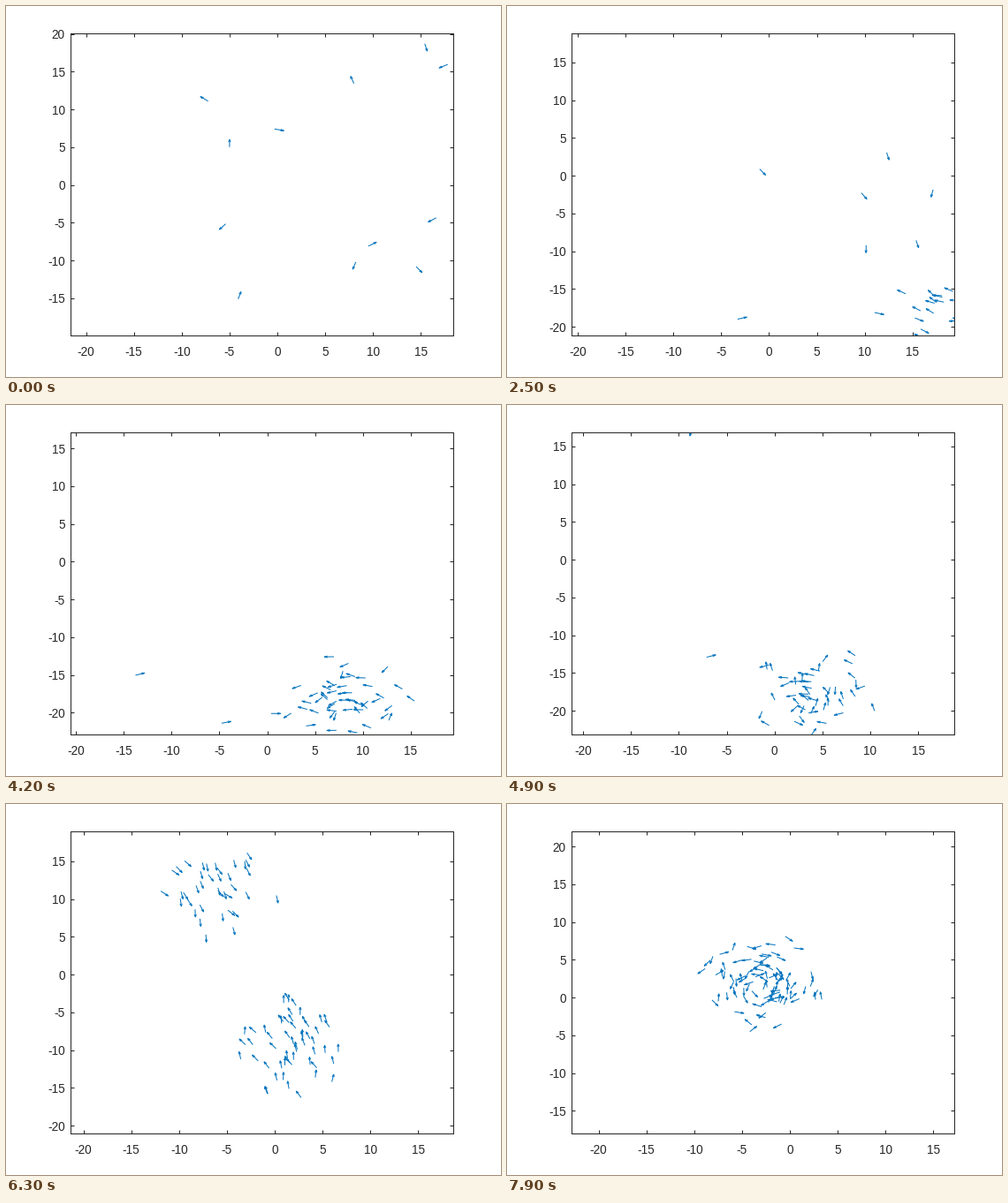
Write a matplotlib script that moves like this. It is 560x420 px and loops after 8 s.

```python
import numpy as np
import matplotlib.pyplot as plt
from matplotlib.animation import FuncAnimation
from matplotlib.collections import LineCollection
from matplotlib.ticker import FuncFormatter, MultipleLocator

W, H, DPI = 560, 420, 100
PX = 72 / DPI              # one pixel in points
INK, BLUE = "#262626", "#0072BD"
HOLD = 3                   # extra ticks on the opening picture
HALF = 20                  # half width of the view
MERGE = 10                 # steps a newcomer takes to turn into its flock

plt.rcParams["font.family"] = "Liberation Sans"
rng = np.random.default_rng(12)

# Key points: (step, x, y)
VIEW = [(0, -1.6, 0.05), (12, -1.53, -0.3), (32, 0.02, -2.2), (46, -1.2, -3.17),
        (60, -1.33, -1.05), (70, -2.12, 0.8), (76, -2.8, 1.99)]
SOUTH = [(0, 17, -17), (32, 13.3, -18), (46, 4.3, -18.2),
         (60, 2, -9.6), (70, -1, -0.2), (76, -2.7, 1.9)]
NORTH = [(0, -40, 60), (46, -11.5, 22.5), (60, -6.5, 12.5), (70, -3.2, 4), (76, -2.7, 2.2)]

# Flyers in view at the start: x, y, heading in degrees
OPENING = np.array([
    (-7.24, 11.1, 143), (-5, 5.02, 90), (-0.3, 7.42, -13), (8, 13.44, 110),
    (15.4, 18.7, -75), (17.8, 15.96, 207), (-5.4, -5.15, 228), (-4.1, -15.1, 73),
    (9.5, -8.1, 32), (8.2, -10.2, 251), (14.5, -10.8, -52), (16.6, -4.35, 213)])


def unit(degrees):
    a = np.radians(degrees)
    return np.stack([np.cos(a), np.sin(a)], axis=-1)


def bend(s, h, p0, m0, p1, m1):
    """Cubic from p0 to p1 in h steps with slopes m0 and m1, s from 0 to 1."""
    a = s * s * (3 - 2 * s)
    return (1 - a) * p0 + a * p1 + h * s * (1 - s) * ((1 - s) * m0 - s * m1)


def route(keys):
    """Smooth path through key points, straight beyond both ends."""
    keys = np.array(keys, float)
    t, p = keys[:, 0], keys[:, 1:]
    m = np.gradient(p, t, axis=0)

    def at(k):
        if k <= t[0]:
            return p[0] + m[0] * (k - t[0])
        if k >= t[-1]:
            return p[-1] + m[-1] * (k - t[-1])
        i = np.searchsorted(t, k, side="right") - 1
        h = t[i + 1] - t[i]
        return bend((k - t[i]) / h, h, p[i], m[i], p[i + 1], m[i + 1])
    return at


view, south, north = route(VIEW), route(SOUTH), route(NORTH)

# Southern flock: opening flyers, two waves from the right, stragglers from the left.
# The northern flock is already together.
FIRST, EARLY, LATE, LEFT, TOP = len(OPENING), 28, 9, 7, 38
N = FIRST + EARLY + LATE + LEFT + TOP
northern = np.arange(N)[:, None] >= N - TOP

reach = np.clip(rng.rayleigh(1, N), 0.15, 2.15)
phase, pulse = rng.uniform(0, 2 * np.pi, (2, N))
spin = rng.choice([-1, 1], N) * rng.uniform(0.6, 0.95, N) / np.maximum(2.6 * reach, 1.5)


def flock(k):
    """Every member circling its flock's centre."""
    centre = np.where(northern, north(k), south(k))
    spread = [np.interp(k, [46, 60, 70, 76], [2.5, 2.6, 2.7, 2.4]),
              np.interp(k, [32, 46, 60, 70, 76], [2.3, 2.6, 3.4, 3.3, 2.5])]
    turn = np.interp(k, [0, 48, 66, 80], [0, 36, 42, 56])   # calmer while travelling
    radius = reach * (1 + 0.25 * np.sin(0.2 * k + pulse))
    return centre + radius[:, None] * unit(np.degrees(phase + spin * turn)) * spread


# When each flyer has joined, and the pose from which it turns in
gap = np.linalg.norm(OPENING[:, :2] - south(12), axis=1)
joined = np.concatenate([gap + 8, rng.uniform(24, 33, EARLY), rng.uniform(38, 45, LATE),
                         np.linspace(37, 56, LEFT), np.zeros(TOP)])
bearing = np.concatenate([OPENING[:, 2] + 180, rng.uniform(-65, 12, EARLY + LATE),
                          rng.uniform(192, 198, LEFT), np.zeros(TOP)])
ahead = -unit(bearing)
goal = np.array([flock(t)[i] for i, t in enumerate(joined)])
pull = np.array([(flock(t + 0.1) - flock(t - 0.1))[i] * 5 for i, t in enumerate(joined)])
leave = joined - MERGE
start = goal - MERGE * ahead
leave[:FIRST], start[:FIRST] = 0, OPENING[:, :2]


def swarm(k):
    span = (joined - leave)[:, None]
    since = (k - leave)[:, None]
    turning = bend(since / span, span, start, ahead, goal, pull)
    incoming = np.where(since < 0, start + since * ahead, turning)
    return np.where((k < joined)[:, None], incoming, flock(k))


def arrows(k):
    """Shaft and open head of every unit arrow."""
    pos = swarm(k)
    d = swarm(k + 0.05) - swarm(k - 0.05)
    d /= np.linalg.norm(d, axis=1, keepdims=True) + 1e-9
    side = d[:, ::-1] * [1, -1]
    tip = pos + d
    left = tip - 0.33 * (d + 0.33 * side)
    right = tip - 0.33 * (d - 0.33 * side)
    return list(np.stack([pos, tip], 1)) + list(np.stack([left, tip, right], 1))


fig = plt.figure(figsize=(W / DPI, H / DPI), dpi=DPI, facecolor="white")
ax = fig.add_axes([73.2 / W, 46.8 / H, 433 / W, 342 / H])
for spine in ax.spines.values():
    spine.set(color=INK, linewidth=PX)
for axis in (ax.xaxis, ax.yaxis):
    axis.set_major_locator(MultipleLocator(5))
    axis.set_major_formatter(FuncFormatter(lambda v, _: f"{round(v)}"))
ax.tick_params(direction="in", top=True, right=True, length=4.3 * PX, width=PX,
               color=INK, labelcolor=INK, labelsize=13.6 * PX)
ax.tick_params(axis="x", pad=11.5 * PX)
ax.tick_params(axis="y", pad=6.5 * PX)
quiver = ax.add_collection(LineCollection([], colors=BLUE, linewidths=PX), autolim=False)


def draw(n):
    k = max(0, n - HOLD)
    x, y = view(k)
    ax.set_xlim(x - HALF, x + HALF)
    ax.set_ylim(y - HALF, y + HALF)
    quiver.set_segments(arrows(k))
    return [quiver]


anim = FuncAnimation(fig, draw, frames=80, interval=100, repeat=True, repeat_delay=0)
plt.show()
```
